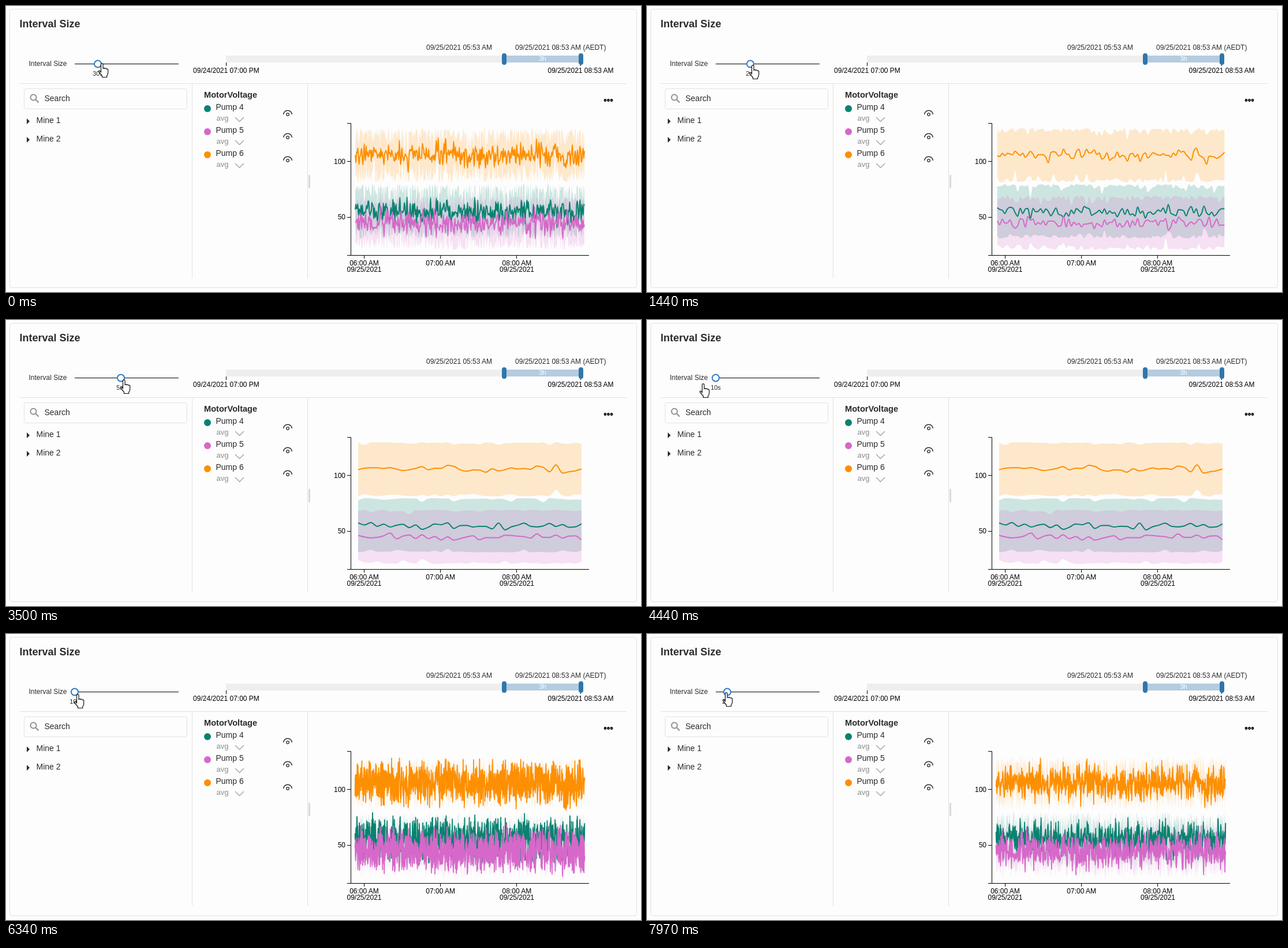
Recreate the animation shown at these times as an HTML page. Size 1100 px wide and 496 px high, loop 8 s.

```html
<!DOCTYPE html>
<html lang="en">
<head>
<meta charset="utf-8">
<title>Interval Size</title>
<style>
  html, body { margin: 0; width: 100%; height: 100%; overflow: hidden; background: #fdfdfd; }
  svg { display: block; width: 1100px; height: 496px; font: 12px "Liberation Sans", Arial, sans-serif; fill: #2b2b2b; }
  .rule { stroke: #e1e1e4; fill: none; }
  .axis { stroke: #000; fill: none; }
  .band { fill-opacity: .2; }
  .line { fill: none; stroke-width: 2; stroke-linejoin: round; }
  .icon { fill: none; stroke: #2b2b2b; stroke-width: 1.3; }
  .black { fill: #000; }
  .muted { fill: #8b8b8b; }
</style>
</head>
<body>
<svg id="stage" viewBox="0 0 1100 496"></svg>
<script>
const LOOP = 8000;
const CHART = { left: 604.5, width: 398, seconds: 10800 };
const SAMPLE_SECONDS = 5;
const CHART_LAG = 320;
const STOPS = [
  { label: '10s', seconds: 10 }, { label: '15s', seconds: 15 }, { label: '20s', seconds: 20 },
  { label: '25s', seconds: 25 }, { label: '30s', seconds: 30 }, { label: '1m', seconds: 60 },
  { label: '2m', seconds: 120 }, { label: '3m', seconds: 180 }, { label: '5m', seconds: 300 }
];
const SLIDER = { left: 119, step: 10 };

const SERIES = [
  { name: 'Pump 4', color: '#0a8270', top: 309, seed: 8 },
  { name: 'Pump 5', color: '#d668c9', top: 329, seed: 21 },
  { name: 'Pump 6', color: '#fd8f02', top: 212, seed: 5 }
];
const BAND_HEIGHT = 94;

// Hand drags, each starting where the one before ended.
const HAND_START = { x: 160, y: 99 };
const DRAGS = [
  { start: 40, end: 400, x: 168, y: 101 },
  { start: 840, end: 1200, x: 177, y: 102 },
  { start: 1870, end: 2500, x: 187, y: 102 },
  { start: 2940, end: 3500, x: 198, y: 103 },
  { start: 4140, end: 4300, x: 84, y: 111 },
  { start: 4300, end: 4940, x: 115, y: 107 },
  { start: 5540, end: 6340, x: 118, y: 104 },
  { start: 7570, end: 7970, x: 131, y: 101 }
];

function random(seed) {
  return () => {
    seed = (seed + 0x6D2B79F5) | 0;
    let h = Math.imul(seed ^ (seed >>> 15), seed | 1);
    h ^= h + Math.imul(h ^ (h >>> 7), h | 61);
    return ((h ^ (h >>> 14)) >>> 0) / 4294967296;
  };
}

const clamp = (v, low, high) => Math.min(high, Math.max(low, v));
const average = list => list.reduce((sum, v) => sum + v, 0) / list.length;

function makeSamples({ top, seed }) {
  const next = random(seed);
  return Array.from({ length: CHART.seconds / SAMPLE_SECONDS }, () => top + next() * BAND_HEIGHT);
}

// Monotone cubic through points [x, y].
function curve(points) {
  const secant = i => (points[i + 1][1] - points[i][1]) / (points[i + 1][0] - points[i][0]);
  const last = points.length - 1;
  const slopes = points.map((_, i) => {
    if (i === 0) return secant(0);
    if (i === last) return secant(last - 1);
    const a = secant(i - 1), b = secant(i);
    return a * b > 0 ? 2 * a * b / (a + b) : 0;
  });
  return points.map(([x, y], i) => {
    if (i === 0) return `${x.toFixed(2)},${y.toFixed(2)}`;
    const [px, py] = points[i - 1], third = (x - px) / 3;
    return 'C' + [px + third, py + slopes[i - 1] * third, x - third, y - slopes[i] * third, x, y]
      .map(v => v.toFixed(2)).join(' ');
  }).join('');
}

function makePaths(samples, seconds) {
  const count = CHART.seconds / seconds;
  const bins = Array.from({ length: count }, () => []);
  samples.forEach((y, i) => bins[Math.floor(i * SAMPLE_SECONDS / seconds)].push(y));
  const along = measure => bins.map((bin, i) => [CHART.left + (i + .5) * CHART.width / count, measure(bin)]);
  const upper = along(bin => Math.min(...bin));
  const lower = along(bin => Math.max(...bin)).reverse();
  return { line: 'M' + curve(along(average)), band: `M${curve(upper)}L${curve(lower)}Z` };
}

const text = (x, y, content, attrs = '') => `<text x="${x}" y="${y}" ${attrs}>${content}</text>`;
const middle = 'text-anchor="middle" class="black"';
const right = 'text-anchor="end" class="black"';
const size = px => `font-size="${px}"`;
const bold = px => `${size(px)} font-weight="bold"`;

const handle = x => `<rect x="${x - 4}" y="82" width="8" height="20" rx="4" fill="#2e76ab"/>`;

const header = () =>
  text(23.5, 37, 'Interval Size', bold(18)) +
  text(39.5, 104, 'Interval Size') +
  `<path class="axis" d="M119 100.5H299"/>
   <path fill="#eeeeee" d="M381 86H863V98H381z"/><path fill="#b5cce0" d="M863 86H996V98H863z"/>
   <path class="axis" d="M381.5 98v6M995.5 98v6"/>` +
  handle(863) + handle(996) +
  text(929.5, 95, '3h', `${size(11)} text-anchor="middle" fill="#fff"`) +
  text(728, 76, '09/25/2021 05:53 AM') + text(882, 76, '09/25/2021 08:53 AM (AEDT)') +
  text(381.5, 116, '09/24/2021 07:00 PM', middle) + text(995.5, 116, '09/25/2021 08:53 AM', middle);

const tree = () =>
  `<rect class="rule" x="31.5" y="143.5" width="282" height="35" rx="3"/>
   <path d="M51 162l5.5 5.5M52.500 158.500a5 5 0 1 1-10 0a5 5 0 1 1 10 0" fill="none" stroke="#8f8f8f" stroke-width="2"/>` +
  text(66.5, 165, 'Search', size(14)) +
  [1, 2].map(n => {
    const y = 168 + n * 32;
    return `<path d="M36 ${y - 5}l5 5l-5 5z"/>` + text(52.5, y + 3, 'Mine ' + n, size(14));
  }).join('');

const legend = () =>
  text(343, 159, 'MotorVoltage', bold(14.6)) +
  SERIES.map(({ name, color }, i) => `<g transform="translate(0 ${i * 40})">
    <circle cx="349" cy="178" r="6" fill="${color}"/>
    ${text(363.5, 180, name, size(14))}
    ${text(364.5, 199, 'avg', size(13) + ' class="muted"')}
    <path d="M397 193l7.500 7.500l7.500-7.500" fill="none" stroke="#a6a8bd" stroke-width="1.500"/>
    <path class="icon" d="M480.500 188c2-9 13-9 15 0"/>
    <circle class="icon" cx="488" cy="188" r="2.300"/>
  </g>`).join('');

const axes = () =>
  `<path class="axis" d="M591 203.500H597.500V432.500M591 269.500h6M591 366.500h6M591 432.500H1010M620.500 432v6M752.500 432v6M884.500 432v6"/>` +
  text(588, 274, '100', right) + text(588, 370, '50', right) +
  [6, 7, 8].map((hour, i) => text(620.5 + i * 132.2, 450, `0${hour}:00 AM`, middle)).join('') +
  text(620.5, 461, '09/25/2021', middle) + text(885, 461, '09/25/2021', middle) +
  [0, 1, 2].map(i => `<circle class="axis" cx="${1038 + i * 5.5}" cy="163.500" r="1.500" stroke-width="1.800"/>`).join('');

const plot = () =>
  SERIES.map(s => `<path class="band" fill="${s.color}"/>`).join('') +
  SERIES.map(s => `<path class="line" stroke="${s.color}"/>`).join('');

const stage = document.getElementById('stage');
stage.innerHTML = `
  <rect class="rule" x="6.500" y="5.500" width="1086" height="483" rx="4"/>
  <path class="rule" d="M24 134.500H1075M322.500 135V472M522.500 135V472"/>
  <path d="M524 293h3v23h-3z" fill="#d9d9d9"/>
  ${header()}${tree()}${legend()}${plot()}${axes()}
  <text id="value" y="121" font-size="11" text-anchor="middle"></text>
  <circle id="knob" cy="100.500" r="6" fill="#fff" stroke="#2f78c4" stroke-width="2"/>
  <path id="hand" fill="#fff" stroke="#111" stroke-width="1.200" stroke-linejoin="round"
    d="M4.500 16V2.500a1.800 1.800 0 0 1 3.600 0V9.500a1.600 1.600 0 0 1 3 .3a1.600 1.600 0 0 1 3 .7a1.500 1.500 0 0 1 2.600 1V17q0 3-2 5v2.500H6.500V22L1 15.500q-1-2 .6-2.400q1-.2 2.900 2.900z"/>`;

const value = document.getElementById('value');
const knob = document.getElementById('knob');
const hand = document.getElementById('hand');
const bands = stage.querySelectorAll('.band');
const lines = stage.querySelectorAll('.line');

const samples = SERIES.map(makeSamples);
STOPS.forEach(stop => { stop.paths = samples.map(list => makePaths(list, stop.seconds)); });

function handAt(time) {
  return DRAGS.reduce((from, { start, end, x, y }) => {
    const part = clamp((time - start) / (end - start), 0, 1);
    return { x: from.x + (x - from.x) * part, y: from.y + (y - from.y) * part };
  }, HAND_START);
}

// The knob snaps to the stop nearest to the hand.
const stopAt = time =>
  clamp(Math.round((handAt(time).x + 3.5 - SLIDER.left) / SLIDER.step), 0, STOPS.length - 1);

let shownStop;
function draw(now) {
  const time = now % LOOP;
  const { x, y } = handAt(time);
  const stop = stopAt(time);
  const chartStop = stopAt(time - CHART_LAG);
  const knobX = SLIDER.left + stop * SLIDER.step;
  knob.setAttribute('cx', knobX);
  value.setAttribute('x', knobX);
  value.textContent = STOPS[stop].label;
  hand.setAttribute('transform', `translate(${Math.round(x)} ${Math.round(y)})`);
  if (chartStop !== shownStop) {
    STOPS[chartStop].paths.forEach(({ line, band }, i) => {
      lines[i].setAttribute('d', line);
      bands[i].setAttribute('d', band);
    });
    shownStop = chartStop;
  }
}

const begin = performance.now();
(function tick() {
  draw(performance.now() - begin);
  requestAnimationFrame(tick);
})();
</script>
</body>
</html>
```
